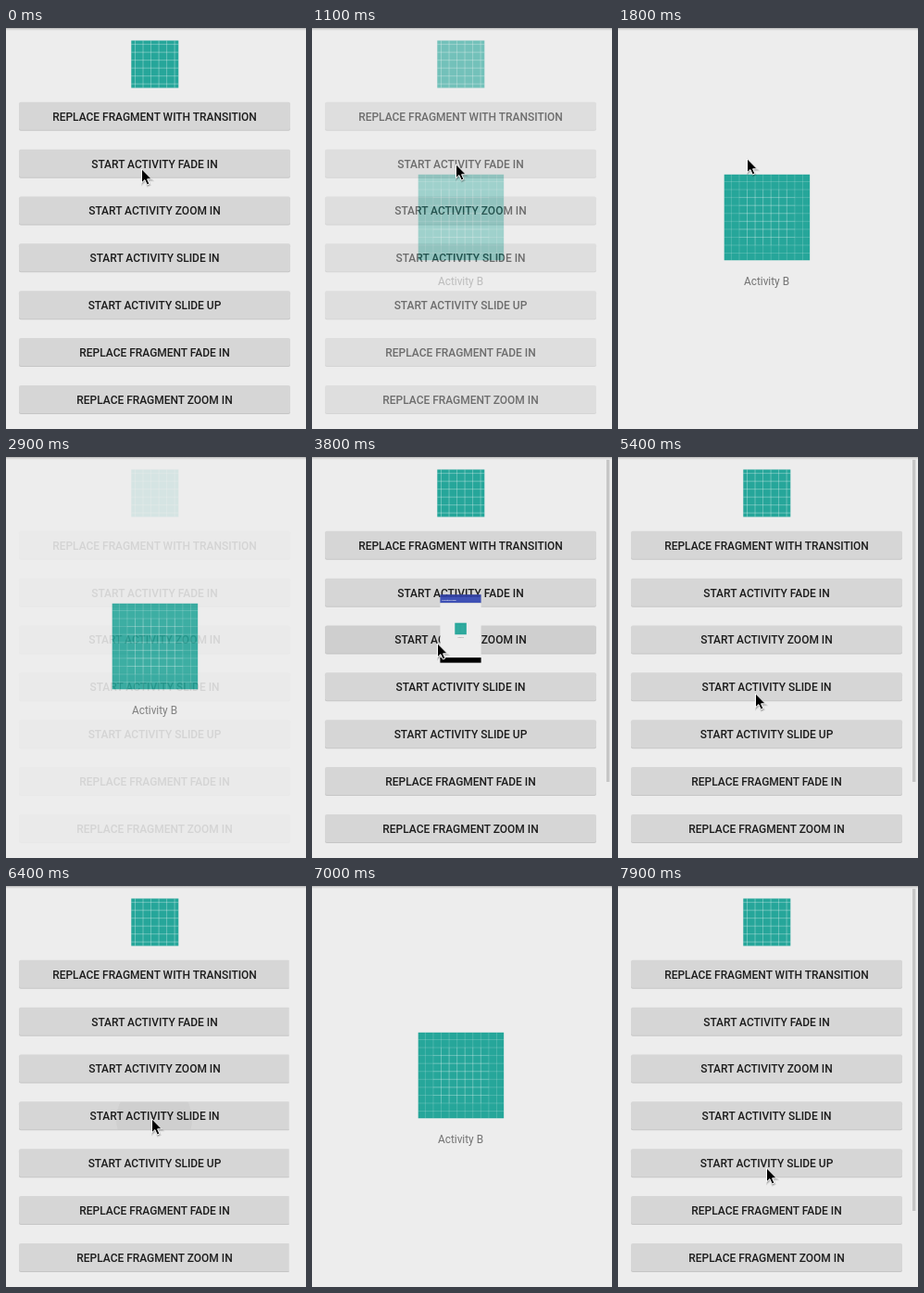
These frames come from a looping animation (324 px wide and 432 px high, 8 s). An HTML page:

```html
<!DOCTYPE html>
<html lang="en">
<head>
<meta charset="utf-8">
<title>Activity transitions</title>
<style>
  html, body { margin: 0; height: 100%; overflow: hidden; background: #ededed; }
  svg { display: block; width: 324px; height: 432px; font-family: Roboto, sans-serif; }
  .btn { font-size: 11.97px; font-weight: 500; fill: #1c1c1c; text-anchor: middle; }
</style>
</head>
<body>
<svg viewBox="0 0 324 432">
  <defs>
    <linearGradient id="shade" x2="0" y2="1">
      <stop offset="0" stop-opacity=".38"/>
      <stop offset=".5" stop-opacity=".12"/>
      <stop offset="1" stop-opacity="0"/>
    </linearGradient>
    <clipPath id="crop"><rect x="135.3" y="13.4" width="51" height="51"/></clipPath>
    <clipPath id="press"><rect x="14" y="80" width="293" height="30" rx="2"/></clipPath>
    <g id="icon">
      <rect width="108" height="108" fill="#26a69a"/>
      <g id="grid" stroke="#fff" stroke-opacity=".2"></g>
    </g>
    <rect id="edge" x="-2.5" y="-1" width="328" height="4" fill="url(#shade)"/>
  </defs>

  <g id="list">
    <rect width="324" height="432" fill="#ededed"/>
    <use href="#edge"/>
    <g clip-path="url(#crop)"><use href="#icon" transform="translate(114.8 -7.1) scale(.852)"/></g>
    <g id="buttons"></g>
    <g id="ripple" clip-path="url(#press)"><circle cx="160" cy="99" fill-opacity=".03"/></g>
    <rect id="bar" x="318" y="3" width="3.4" height="347" fill="#c6c6c6"/>
  </g>

  <g id="page">
    <rect x="-2.5" y="-67.5" width="326" height="20.5" fill="#303f9f"/>
    <rect x="-2.5" y="-47" width="326" height="46" fill="#3f51b5"/>
    <text x="11" y="-17" font-size="16.9" font-weight="500" fill="#fff">TransitionAnim</text>
    <rect x="-2.5" y="-1" width="326" height="434.5" fill="#ededed"/>
    <use href="#edge"/>
    <use href="#icon" transform="translate(114.7 157.8) scale(.856)"/>
    <text x="160.5" y="277" font-size="11.85" fill="#737373" text-anchor="middle">Activity B</text>
    <rect x="-2.5" y="433.5" width="326" height="41"/>
  </g>

  <g id="cursor">
    <path d="M0 0V15L3.4 11.8 5.8 17.2 8.4 16.1 6.1 11H10.8Z" transform="translate(.6 1.4)"
      fill-opacity=".2" stroke="#000" stroke-opacity=".12" stroke-width="2"/>
    <path d="M0 0V15L3.4 11.8 5.8 17.2 8.4 16.1 6.1 11H10.8Z" stroke="#fff" stroke-width="1"/>
  </g>
</svg>
<script>
const LOOP = 8000, STEP = 100, PITCH = 50.85;
const $ = id => document.getElementById(id);
const show = (id, on) => $(id).style.display = on ? '' : 'none';

const labels = ['REPLACE FRAGMENT WITH TRANSITION', 'START ACTIVITY FADE IN',
  'START ACTIVITY ZOOM IN', 'START ACTIVITY SLIDE IN', 'START ACTIVITY SLIDE UP',
  'REPLACE FRAGMENT FADE IN', 'REPLACE FRAGMENT ZOOM IN'];
$('buttons').innerHTML = labels.map((label, i) => `<g transform="translate(0 ${i * PITCH})">
  <rect x="14" y="80.8" width="293" height="30" rx="2" fill="#c6c6c6"/>
  <rect x="14" y="79.8" width="293" height="30" rx="2" fill="#d6d6d6"/>
  <text class="btn" x="160.5" y="99.7">${label}</text></g>`).join('');

// Full lines, with the inner ones drawn twice so they look brighter.
let grid = '';
for (let p = 9; p < 108; p += 10) {
  grid += `<path d="M${p} 0V108M0 ${p}H108"/>`;
  if (p > 20 && p < 80) grid += `<path d="M${p} 19V89M19 ${p}H89"/>`;
}
$('grid').innerHTML = grid;

// Cursor path: time, x, y
const path = [
  [0, 146, 151], [100, 146, 151], [300, 155, 146], [1700, 155, 146], [1800, 139, 140],
  [2300, 32, 490], [3700, 32, 490], [3800, 135, 200], [4200, 135, 200], [4600, 30, 470],
  [5200, 60, 480], [5400, 148, 254], [5700, 150, 250], [6000, 157, 250], [6600, 157, 250],
  [7000, 60, 470], [7600, 90, 480], [7700, 120, 420], [7900, 160, 303], [LOOP, 160, 303]
];

function cursorAt(t) {
  const i = path.findIndex(k => k[0] > t);
  const [t0, x0, y0] = path[i - 1], [t1, x1, y1] = path[i];
  const k = (t - t0) / (t1 - t0);
  return [x0 + (x1 - x0) * k + .5, y0 + (y1 - y0) * k + .8];
}

function ease(t, start, end) {
  const k = Math.min(1, Math.max(0, (t - start) / (end - start)));
  return (1 - Math.cos(Math.PI * k)) / 2;
}

// How far the second page is open between its entry and its exit
const open = (t, a, b, c, d) => ease(t, a, b) - ease(t, c, d);

function drawRipple(t) {
  const zoomRow = t >= 3800 && t < 4400, slideRow = t >= 6200 && t < 6700;
  show('ripple', zoomRow || slideRow);
  $('ripple').setAttribute('transform', `translate(0 ${(zoomRow ? 2 : 3) * PITCH})`);
  $('ripple').firstChild.setAttribute('r', zoomRow ? 150 : 41);
}

function draw(t) {
  const page = $('page');
  const fade = open(t, 950, 1300, 2760, 3390);
  const zoom = open(t, 3704, 4104, 4890, 5290);
  const slide = open(t, 6340, 6740, 7380, 7780);
  let alpha = 1, move = '';
  if (t < 3500) alpha = fade;
  else if (t < 6000) move = `translate(160.5 182) scale(${zoom}) translate(-160.5 -182)`;
  else move = `translate(${326 * (1 - slide)} 0)`;
  show('page', fade + zoom + slide > 0);
  page.setAttribute('opacity', alpha);
  page.setAttribute('transform', move);

  show('bar', t >= 3800);
  drawRipple(t);
  $('cursor').setAttribute('transform', `translate(${cursorAt(t)})`);
}

function frame() {
  const t = performance.now() % LOOP;
  draw(Math.floor(t / STEP) * STEP);
  requestAnimationFrame(frame);
}
frame();
</script>
</body>
</html>
```
